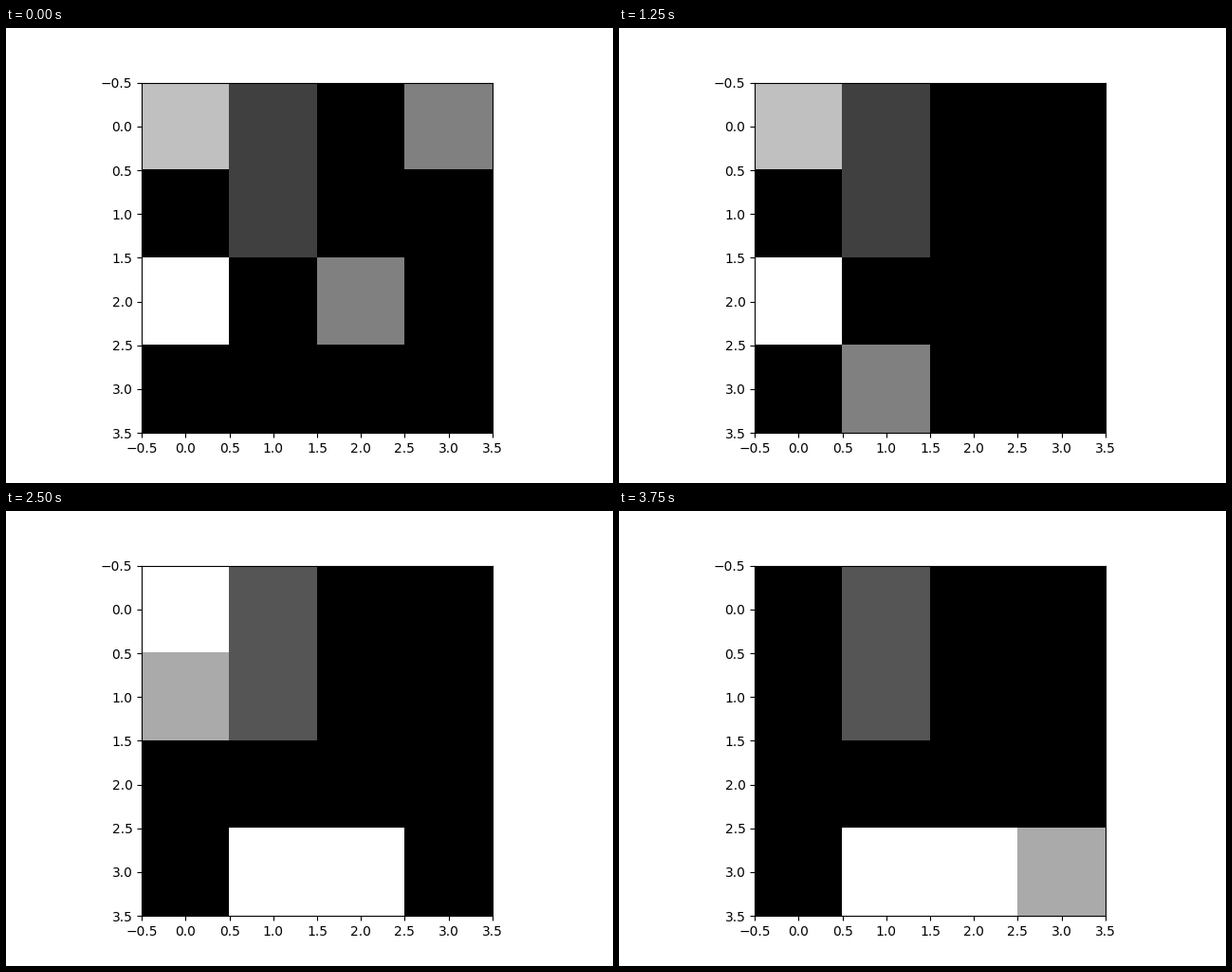
Recreate the animation shown at these times as a matplotlib script. Size 640 by 480 pixels, loop 4000 ms.

```python
import itertools
import math

import numpy as np
import matplotlib.pyplot as plt
from matplotlib.animation import FuncAnimation

SIZE = 4
WALL, AGENT, DELIVERED = 1, 2, 3
START = (2, 2)
PARCELS = {(0, 3): 2, (2, 0): 4, (0, 0): 3}  # cell: value, in pick-up order


def build_room():
    room = np.zeros((SIZE, SIZE))
    room[:2, 1] = WALL
    for cell, value in PARCELS.items():
        room[cell] = value
    return room


def with_agent(room, cell):
    view = room.copy()
    view[cell] = AGENT
    return view


def step_toward(room, cell, goal):
    """Free neighbour, diagonals included, that lies closest to the goal."""
    spans = [range(max(k - 1, 0), min(k + 2, SIZE)) for k in cell]
    free = [c for c in itertools.product(*spans)
            if c != cell and (c == goal or room[c] == 0)]
    return min(free, key=lambda c: math.dist(c, goal))


def simulate():
    """Carry each parcel to the next place on the bottom row."""
    room, cell = build_room(), START
    views = [with_agent(room, cell)]
    for place, parcel in enumerate(PARCELS, start=1):
        for goal, left_behind in ((parcel, 0), ((SIZE - 1, place), DELIVERED)):
            while cell != goal:
                cell = step_toward(room, cell, goal)
                if cell == goal:
                    room[cell] = left_behind
                views.append(with_agent(room, cell))
    return views


views = simulate()
fig, ax = plt.subplots(figsize=(6.4, 4.8), dpi=100)
image = ax.imshow(views[0], cmap="gray")


def update(step):
    image.set_data(views[step])
    image.set_clim(0, views[step].max())
    return [image]


anim = FuncAnimation(fig, update, frames=len(views), interval=250,
                     init_func=lambda: update(0), repeat=True, repeat_delay=0)
plt.show()
```
